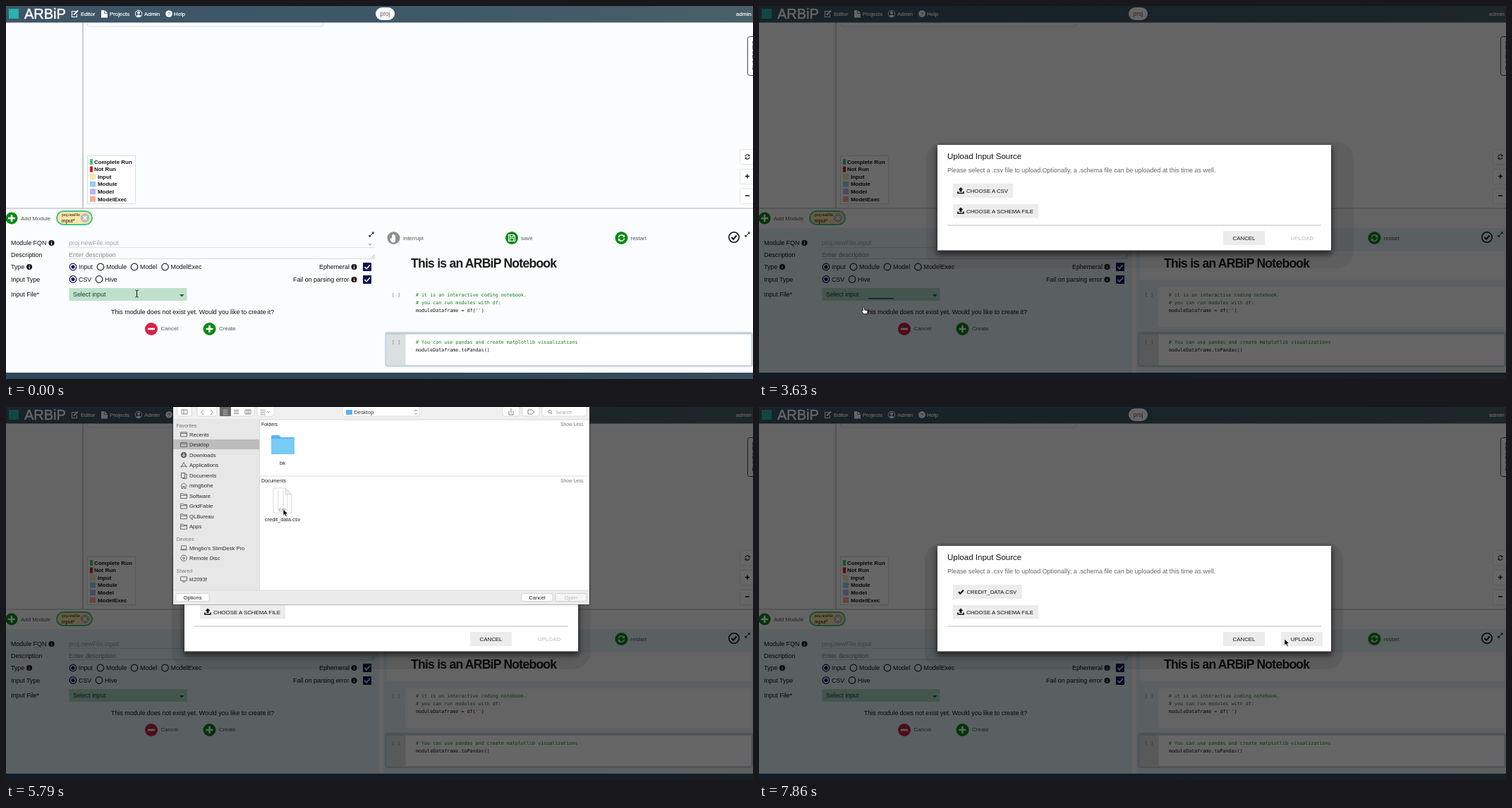
Recreate the animation shown at these times as an HTML page. Size 1059 px wide and 529 px high, loop 8 s.

```html
<!DOCTYPE html>
<html lang="en">
<head>
<meta charset="utf-8">
<title>Notebook upload</title>
<style>
html, body { margin: 0; width: 100%; height: 100%; overflow: hidden; background: #fafcfd; }
svg { display: block; width: 100%; height: 100%; }
text { font-family: "Liberation Sans", Arial, sans-serif; white-space: pre; }
.mono { font-family: "DejaVu Sans Mono", monospace; }
</style>
</head>
<body>
<svg id="stage" viewBox="0 0 1059 529" preserveAspectRatio="none"></svg>
<script>
const GREEN = '#078a14', NAVY = '#0c0f52', GREY = '#555';

const text = (x, y, s, size = 8.9, fill = '#111', extra = '') =>
  `<text x="${x}" y="${y}" font-size="${size}" fill="${fill}" ${extra}>${s}</text>`;
const mid = (x, y, s, size, fill) => text(x, y, s, size, fill, 'text-anchor="middle"');
const bold = (x, y, s, size, fill) => text(x, y, s, size, fill, 'font-weight="bold"');
const code = (x, y, s, fill = '#111') => text(x, y, s, 6.69, fill, 'class="mono"');
const rect = (x, y, w, h, fill, extra = '') =>
  `<rect x="${x}" y="${y}" width="${w}" height="${h}" fill="${fill}" ${extra}/>`;
const circle = (x, y, r, fill, extra = '') =>
  `<circle cx="${x}" cy="${y}" r="${r}" fill="${fill}" ${extra}/>`;
const line = (d, stroke, w = 1, extra = '') =>
  `<path d="${d}" fill="none" stroke="${stroke}" stroke-width="${w}" ${extra}/>`;
const shape = (d, fill, extra = '') => `<path d="${d}" fill="${fill}" ${extra}/>`;
const at = (x, y, s) => `<g transform="translate(${x} ${y})">${s}</g>`;
const group = (id, s, extra = '') => `<g id="${id}" ${extra}>${s}</g>`;

const refresh = (x, y, c, k = 1) => at(x, y, `<g transform="scale(${k})">` +
  line('M-3.6-.6A3.7 3.7 0 0 1 2.8-2.5M3.6.6A3.7 3.7 0 0 1-2.8 2.5', c, 1.3) +
  shape('M4-4V-.8H.8ZM-4 4V.8H-.8Z', c) + '</g>');
const info = (x, y) => circle(x, y, 4, '#111') +
  line(`M${x} ${y - .6}v3M${x} ${y - 2.6}v1.2`, '#fff', 1.3);
const radio = (x, y, label, on) =>
  circle(x, y, 4.8, '#fff', `stroke="${on ? NAVY : '#222'}" stroke-width="1.2"`) +
  (on ? circle(x, y, 2.6, NAVY) : '') + text(x + 8, y + 3, label);
const checkbox = y => rect(506, y, 12, 12, NAVY, 'rx="1"') +
  line(`M508.5 ${y + 6}l2.5 2.8 5-5.5`, '#fff', 1.5);
const round = (x, y, fill, mark, r = 9) => circle(x, y, r, fill) +
  line(`M${x - 5} ${y}h10` + (mark === '+' ? `M${x} ${y - 5}v10` : ''), '#fff', 2.6);
const expand = (x, y) => line(`M${x - 2.5} ${y + 2.5}l5-5`, '#111') +
  shape(`M${x + .3} ${y - 3.5}h3.2v3.2zM${x - .3} ${y + 3.5}h-3.2v-3.2z`, '#111');

function header() {
  const item = (x, s) => text(x, 14, s, 7.8, '#fff', 'stroke="#fff" stroke-width=".2"');
  return rect(0, 0, 1059, 23.5, 'url(#bar)') + rect(4, 4, 14, 14, '#27b3ae') +
    text(26, 18, 'ARBiP', 20, '#fff', 'stroke="#fff" stroke-width=".5"') +
    item(106, 'Editor') + item(147, 'Projects') + item(196, 'Admin') + item(238, 'Help') +
    line('M99.5 7.5h-6v8h7v-4', '#fff', 1.1) + line('M96 12.5l6-6', '#fff', 2) +
    shape('M135 6h5l4 4v6.5h-9z', '#fff') + line('M139.5 6v4.5h4.5', '#50697a', .8) +
    circle(188, 11, 4.8, 'none', 'stroke="#fff"') + circle(188, 9.5, 2, '#fff') +
    shape('M184.5 14.3q3.5-4 7 0q-3.5 3-7 0', '#fff') +
    circle(231, 11, 4.8, '#fff') + mid(231, 14, '?', 8, '#3e5668') +
    rect(524, 2, 27, 18, '#fff', 'rx="9"') + mid(537.5, 14, 'proj', 8.3, GREY) +
    text(1035, 14, 'admin', 8, '#fff', 'stroke="#fff" stroke-width=".15"');
}

function canvasArea() {
  const legend = [['Complete Run', '#3cc47c'], ['Not Run', '#e0141c'], ['Input', '#fbe5a6'],
    ['Module', '#94cdf3'], ['Model', '#b7b1f8'], ['ModelExec', '#fba99c']];
  return line('M109 23V287', '#c9cbcc', 2) +
    line('M115.5 23v3q0 3 3 3h328q3 0 3-3v-3', '#dcdfe0') +
    rect(1051.5, 43.5, 20, 55, '#fff', 'rx="3" stroke="#333" stroke-width=".9"') +
    text(0, 0, 'RUNTIMES', 8, '#222', 'transform="translate(1062.5 91) rotate(-90)"') +
    [203, 231, 259].map(y => rect(1040.5, y + .5, 24, 21, '#fff', 'rx="2" stroke="#e1e4e6"')).join('') +
    refresh(1051, 214, '#111', .85) +
    line('M1048 241.5h6M1051 238.5v6M1048 269h6', '#111', 1.4) +
    rect(115.5, 212.5, 68, 68, '#fff', 'stroke="#dadddf"') +
    legend.map(([s, c], i) => {
      const y = 221 + i * 10.55;
      return rect(119, y - 4, i < 2 ? 4 : 8, 8, c) + bold(i < 2 ? 125 : 130, y + 2.8, s, 7.95);
    }).join('') + line('M0 287H1059', '#c9cccd', 1.6);
}

function form() {
  return round(8, 301, GREEN, '+', 8.5) + text(21, 303.5, 'Add Module', 7.9, GREY) +
    rect(72, 291, 50, 19, '#fae6a8', 'rx="9.5" stroke="#45c48a" stroke-width="2"') +
    text(79, 298, 'proj.newFile', 4.8) + text(79, 306.5, 'input*', 7.3) +
    circle(112, 300.5, 6.3, '#b9bdbd') + line('M109.5 298l5 5m0-5l-5 5', '#fff', 1.5) +
    expand(518, 324) + text(7, 339, 'Module FQN') + info(64.5, 336) +
    text(89, 339, 'proj.newFile.input', 9, '#a2a6a9') + line('M89 342.5H523', '#dfe3e5') +
    shape('M513 337h6l-3 3z', '#bbb') + text(7, 356, 'Description') +
    text(89, 356, 'Enter description', 8.9, '#858a8d') + line('M89 358.5H523', '#d5d9db') +
    line('M518 357.5l5-5M521 357.5l2-2', '#999', .8) +
    text(7, 373, 'Type') + info(33, 370) + radio(95, 370, 'Input', 1) + radio(134, 370, 'Module') +
    radio(182, 370, 'Model') + radio(225.5, 370, 'ModelExec') +
    text(444, 373, 'Ephemeral') + info(493.5, 370) + checkbox(364) +
    text(7, 391, 'Input Type') + radio(95, 387.5, 'CSV', 1) + radio(132, 387.5, 'Hive') +
    text(407, 391, 'Fail on parsing error') + info(493.5, 388) + checkbox(382) +
    text(7, 412, 'Input File*') + rect(89.5, 400, 167, 18, '#bfe1cb') +
    text(95, 412, 'Select input', 8.9, '#233f30') + shape('M246 409h6.5l-3.25 3.5z', '#275a36') +
    text(149, 437, 'This module does not exist yet. Would you like to create it?') +
    round(206, 458, '#d92046', '-') + text(219.5, 460, 'Cancel', 7.9, GREY) +
    round(288.5, 458, GREEN, '+') + text(302, 460, 'Create', 7.9, GREY);
}

function notebook() {
  const label = (x, s) => text(x, 331.5, s, 7.9, GREY);
  return circle(549.5, 329, 9, '#8f9191') +
    shape('M545 329l2 1v-5h1.2v-1.5h1.3v1h1.3v1h1.3v8q-1 2-3.5 2q-2 0-4-4z', '#fff') +
    label(563, 'interrupt') + circle(717, 329, 9, GREEN) +
    line('M712.5 324.5h7l2 2v7h-9zM714.5 324.5v3h4.5v-3M714.5 333v-3.5h5v3.5', '#fff', 1.1) +
    label(730, 'save') + circle(872.5, 329, 9, GREEN) + refresh(872.5, 329, '#fff', 1.15) +
    label(885.5, 'restart') + circle(1032, 328, 7.2, '#fff', 'stroke="#111" stroke-width="1.6"') +
    line('M1028.5 328l2.6 2.8 4.6-5.3', '#111', 2) + expand(1051, 324) +
    text(574, 371, 'This is an ARBiP Notebook', 17.6, '#1c1c1c', 'font-weight="bold" letter-spacing="-.78"') +
    code(547, 411.5, '[ ]', '#777') + code(581, 411.5, '# it is an interactive coding notebook.', '#157a15') +
    code(581, 423, '# you can run modules with df:', '#157a15') +
    code(581, 434, 'moduleDataframe = df(<tspan fill="#b22">\'\'</tspan>)') +
    rect(538.5, 463.5, 519, 47, '#fff', 'rx="2" stroke="#c4d3da" stroke-width="2.5"') +
    rect(540, 465, 26.5, 44, '#dcdfe0') + line('M540 465H1056', '#aebbc1', 1) +
    code(547, 479, '[ ]', '#777') +
    code(581, 479, '# You can use pandas and create matplotlib visualizations', '#157a15') +
    code(581, 490, 'moduleDataframe.toPandas()') +
    rect(0, 520, 1059, 9, 'url(#bar)') + rect(0, 520, 1059, 9, '#152a44', 'opacity=".35"');
}

function dim() {
  const panels = 'M0 315H529V520H0ZM535 315H1059V520H535Z';
  const cells = 'M540 348H1057V388H540ZM566 399H1057V455H566ZM538 463H1058V511H538Z';
  return rect(0, 0, 1059, 529, '#000', 'opacity=".6"') +
    shape(panels + cells, '#e4f1f6', 'fill-rule="evenodd" style="mix-blend-mode:multiply"') +
    group('wideShade', rect(237, 193, 606, 179, '#000', 'rx="24" opacity=".06"')) +
    group('sheetShade', rect(235, 193, 593, 179, '#000', 'rx="24" opacity=".08"')) +
    rect(251, 199, 562, 154, '#000', 'rx="6" opacity=".5" filter="url(#blur)"');
}

const upIcon = (x, y) => shape(`M${x} ${y - 5}l3.5 3.5h-2v3h-3v-3h-2z`, '#111') +
  line(`M${x - 4} ${y + 1}v2.5h8v-2.5`, '#111', 1.7);

function modal() {
  return rect(253, 197, 558, 149.5, '#fff') + text(267, 217, 'Upload Input Source', 11.55) +
    text(267, 236, 'Please select a .csv file to upload.Optionally, a .schema file can be uploaded at this time as well.', 8.95, '#666') +
    group('pick', rect(275, 252, 85, 20, '#ececec', 'id="pickBg"') + upIcon(286, 262) +
      text(294, 265, 'CHOOSE A CSV', 7.88)) +
    group('picked', rect(275, 252, 98, 20, '#ececec') + line('M283 262.3l2.3 2.4 4.5-5', '#111', 2.2) +
      text(294.5, 265, 'CREDIT_DATA.CSV', 7.75)) +
    rect(275, 281, 121, 19.5, '#ececec', 'id="schemaBg"') + upIcon(286, 290.5) +
    text(294, 293.5, 'CHOOSE A SCHEMA FILE', 7.88) + line('M267 311H797', '#dedede', 2) +
    rect(658, 319, 59, 20, '#ececec') + mid(687.5, 332, 'CANCEL', 7.9, '#111') +
    group('upOff', mid(770, 332, 'UPLOAD', 7.9, '#bdbdbd')) +
    group('upOn', rect(740, 319, 59, 20, '#ececec') + mid(770, 332, 'UPLOAD', 7.9, '#111'));
}

function sideIcon(kind, x, y) {
  const g = '#666';
  const d = {
    box: 'M-4.5-3h9v6h-9zM-4.5-1.3h9',
    folder: 'M-4.5 3.5v-7h3.5l1 1.3h4.5v5.7zM-4.5-.8h9',
    page: 'M-3.5-3.5h5v7h-5zM1.5-2h2.5v6.5h-5v-1',
    home: 'M-4.5 0l4.5-4 4.5 4M-3 0v4h2v-3h2v3h2v-4',
    app: 'M-4 3.5l4-7.5 4 7.5M-4.5 1.5h9',
    laptop: 'M-3.5-3h7v5h-7zM-5 3h10',
    screen: 'M-4.5-3.5h9v5.5h-9zM-2 3.7h4'
  }[kind];
  return at(x, y, kind === 'down' ? circle(0, 0, 4.3, g) + line('M0-2.5v4.5M-2 .3l2 2 2-2', '#eee')
    : kind === 'disc' ? circle(0, 0, 4.2, 'none', `stroke="${g}"`) + circle(0, 0, 1.4, 'none', `stroke="${g}"`)
    : line(d, g, .95));
}

function sheet() {
  const push = (x, w, s, id, fill = '#fff', ink = '#222') =>
    group(id, rect(x, 264.5, w, 11, fill, 'rx="2.5" stroke="#c6c6c6" stroke-width=".7"') +
      mid(x + w / 2, 272.7, s, 7.5, ink));
  const tool = (x, w) => rect(x, -4, w, 17, '#fff', 'rx="2.5" stroke="#d0d0d0" stroke-width=".7"');
  const item = ([icon, s], y) => sideIcon(icon, 252, y - 2.7) + text(260, y, s, 7.6, '#2b2b2b');
  const fav = [['box', 'Recents'], ['box', 'Desktop'], ['down', 'Downloads'], ['app', 'Applications'],
    ['page', 'Documents'], ['home', 'mingbohe'], ['folder', 'Software'], ['folder', 'GridFable'],
    ['folder', 'QLBureau'], ['folder', 'Apps']];
  const head = (y, s) => text(241.5, y, s, 7, '#777');
  const paper = shape('M379 115h17l9 9v26h-26z', '#fff', 'stroke="#cfcfcf" stroke-width=".8"') +
    shape('M396 115v9h9z', '#eee', 'stroke="#cfcfcf" stroke-width=".8"');
  return rect(237, 0, 590, 280, '#fff') + rect(237, 0, 590, 18, '#f0f0f0') + line('M237 18H827', '#d5d5d5') +
    tool(243, 20) + tool(271, 27) + tool(303, 49) + tool(356, 24) + tool(477, 109) + tool(704, 24) +
    tool(732, 24) + tool(760, 63) + rect(303, -4, 16, 17, '#6a6a6a') +
    line('M249 4h8v6h-8zM252 4v6M280 4l-3 3.5 3 3.5M290 4l3 3.5-3 3.5M323 4.5h7M323 7h7M323 9.5h7M339 4h8v6h-8zM341.7 4v6M344.3 4v6M370 6l2 2 2-2M579 6l2-2 2 2M579 8.5l2 2 2-2M713 6v5h6v-5M716 9v-7M740 4h6l3 3-3 3h-6zM774 10l-2-2', '#777', .9) +
    line('M308 4.5h6M308 7.5h6M308 10.5h6M361 4.5h7M361 7.5h7M361 10.5h7', '#aaa', 2, 'stroke-dasharray="1.6 .8"') +
    circle(771, 6.5, 2.2, 'none', 'stroke="#888" stroke-width=".9"') + text(779, 10, 'Search', 7.5, '#aaa') +
    rect(482, 4, 9, 7, '#58b4ea', 'rx="1"') + text(493.5, 10, 'Desktop', 7.6, '#333') +
    rect(237, 18.5, 122.5, 241.5, '#e7e7e7') + rect(237, 46, 122.5, 14, '#bcbcbc') +
    line('M359.5 18V260', '#d2d2d2', .8) + head(29, 'Favorites') +
    fav.map((f, i) => item(f, 41.6 + i * 14.53)).join('') +
    head(190, 'Devices') + item(['laptop', 'Mingbo\'s SlimDesk Pro'], 202.5) + item(['disc', 'Remote Disc'], 217) +
    head(234.5, 'Shared') + item(['screen', 'kt2093f'], 247) +
    text(362, 26.5, 'Folders', 6.9, '#222') + text(786, 26.5, 'Show Less', 6.7, '#777') +
    shape('M376 42q0-2 2-2h9l3 3h17q2 0 2 2v20q0 2-2 2h-29q-2 0-2-2z', '#54b9ec') +
    rect(376, 45, 33, 22, '#78ccf5', 'rx="1.5"') + mid(392, 81.5, 'bk', 7.5, '#222') +
    line('M360 98H827', '#dcdcdc') + text(362, 106.5, 'Documents', 6.9, '#222') +
    text(786, 106.5, 'Show Less', 6.7, '#777') +
    group('fileOff', paper + line('M386 118v30M393 118v30M399 124v24', '#e2e2e2', 1.2) +
      mid(392, 148, 'CSV', 5, '#555') + mid(392, 161.5, 'credit_data.csv', 7.5, '#222')) +
    group('fileOn', rect(372, 113, 40, 39, '#e3e3e3', 'rx="2"') + paper + mid(392, 148, 'CSV', 5, '#444') +
      rect(366, 154, 52, 10, '#fdc708', 'rx="1.5"') + mid(392, 161.5, 'credit_data.csv', 7.5, '#fff')) +
    rect(237, 260, 590, 20, '#ececec') + line('M237 260H827', '#d6d6d6', .8) +
    push(241, 47, 'Options', 'options') + push(731, 44, 'Cancel', 'cancel') +
    push(779, 44, 'Open', 'openOff', '#f6f6f6', '#b5b5b5') + push(779, 44, 'Open', 'openOn', '#1a7cf8', '#fff');
}

const cursors = {
  beam: line('M-2.2-5q2.2 0 2.2 1.2v7.6q0 1.2-2.2 1.2M2.2-5q-2.2 0-2.2 1.2v7.6q0 1.2 2.2 1.2', '#111', .9),
  hand: shape('M-.9.8q0-1.2 1-1.2t1 1.2v3l3.8 1q1.2.5.9 1.8l-.9 3.2h-4.5l-2.7-3.5q-.6-1.4.6-1.3l.8.7z',
    '#fff', 'stroke="#111" stroke-width=".9"'),
  arrow: shape('M0 0v9.2l2.2-2 1.5 3.4 1.6-.7-1.5-3.3h3z', '#000', 'stroke="#fff" stroke-width=".7"')
};

const stage = document.getElementById('stage');
stage.innerHTML = `<defs>
  <linearGradient id="bar"><stop stop-color="#3e5567"/><stop offset=".5" stop-color="#3d5767"/><stop offset="1" stop-color="#4a6068"/></linearGradient>
  <filter id="blur" x="-10%" y="-20%" width="120%" height="140%"><feGaussianBlur stdDeviation="3.5"/></filter>
  <clipPath id="leaving"><path d="M360 31H827V260H360ZM237 46H359.5V60H237ZM237 260H827V280H237Z"/></clipPath></defs>` +
  rect(0, 0, 1059, 529, '#fafcfd') + canvasArea() + form() + notebook() + header() +
  rect(0, 414, 0, 1.6, '#16752c', 'id="underline"') +
  group('menu', rect(90, 419, 168, 23, '#000', 'opacity=".25" filter="url(#blur)"') +
    rect(89, 418, 168, 22, '#eee') + text(95, 432, 'Upload a csv')) +
  group('dim', dim()) + group('ghost', rect(237, -9, 590, 252, '#000', 'id="ghostBg" opacity=".05"')) +
  group('modal', modal()) +
  group('rim', line('', '#000', 1.6, 'id="rimLine" opacity=".4"')) +
  group('sheet', sheet()) +
  Object.keys(cursors).map(k => group(k, cursors[k])).join('');

const el = {};
stage.querySelectorAll('[id]').forEach(e => el[e.id] = e);

// Each step overrides part of the state before it.
const steps = [
  [0, { cur: ['beam', 185.5, 408] }],
  [140, { cur: ['beam', 212, 409.5] }],
  [380, { cur: ['beam', 229, 410.5] }],
  [980, { cur: ['beam', 235, 410.5] }],
  [1120, { cur: ['beam', 238.7, 410.5] }],
  [2890, { bar: [150, 50] }],
  [3040, { bar: [89.5, 167], menu: .5 }],
  [3190, { menu: 1, cur: ['hand', 215, 421] }],
  [3340, { cur: ['hand', 166, 427] }],
  [3480, { cur: ['hand', 148, 427] }],
  [3630, { menu: 0, modal: 1, wide: 1, bar: [155, 36] }],
  [3780, { bar: 0 }],
  [4010, { cur: ['hand', 158, 420] }],
  [4160, { cur: ['arrow', 205, 372] }],
  [4310, { cur: ['arrow', 258, 322] }],
  [4450, { cur: ['hand', 302, 287], hover: 'schema' }],
  [4600, { cur: ['hand', 319, 267], hover: 'pick' }],
  [4750, { cur: ['hand', 324, 260] }],
  [5050, { ghost: 60, wide: 0, shade: 1 }],
  [5200, { ghost: 243 }],
  [5350, { ghost: 280, sheet: 1, hover: '' }],
  [5490, { cur: ['arrow', 343, 225] }],
  [5640, { cur: ['arrow', 381, 166] }],
  [5790, { cur: ['arrow', 393, 145] }],
  [5940, { file: 1, open: 1 }],
  [6090, { cur: ['arrow', 421, 154] }],
  [6230, { cur: ['arrow', 763, 267] }],
  [6530, { cur: ['arrow', 799, 267] }],
  [6830, { sheet: 2, ghost: 279 }],
  [6970, { sheet: 0, ghost: 150 }],
  [7120, { ghost: 0 }],
  [7420, { picked: 1, cur: ['arrow', 796, 275] }],
  [7570, { cur: ['arrow', 779, 306] }],
  [7710, { cur: ['arrow', 757, 324] }],
  [7860, { cur: ['arrow', 745, 329] }]
];

const show = (id, on) => { el[id].style.display = on ? '' : 'none'; };

function draw(s) {
  for (const k in cursors) show(k, k === s.cur[0]);
  el[s.cur[0]].setAttribute('transform', `translate(${s.cur[1]} ${s.cur[2]})`);
  show('underline', s.bar);
  if (s.bar) {
    el.underline.setAttribute('x', s.bar[0]);
    el.underline.setAttribute('width', s.bar[1]);
  }
  show('menu', s.menu);
  el.menu.setAttribute('transform', `translate(0 ${418 * (1 - (s.menu || 1))}) scale(1 ${s.menu || 1})`);
  show('dim', s.modal);
  show('modal', s.modal);
  show('wideShade', s.wide);
  show('sheetShade', s.shade);
  show('ghost', s.ghost);
  show('rim', s.ghost);
  if (s.ghost) {
    el.ghostBg.setAttribute('height', s.ghost + 9);
    el.rimLine.setAttribute('d', `M236.5 23V${s.ghost}H827.5V23`);
  }
  show('sheet', s.sheet);
  el.sheet.setAttribute('clip-path', s.sheet === 2 ? 'url(#leaving)' : 'none');
  el.sheet.setAttribute('transform', `translate(0 ${s.sheet === 2 ? -1 : 0})`);
  show('fileOff', !s.file);
  show('fileOn', s.file);
  show('openOff', !s.open);
  show('openOn', s.open);
  show('pick', !s.picked);
  show('picked', s.picked);
  show('upOff', !s.picked);
  show('upOn', s.picked);
  el.pickBg.setAttribute('fill', s.hover === 'pick' ? '#d0d0d0' : '#ececec');
  el.schemaBg.setAttribute('fill', s.hover === 'schema' ? '#d0d0d0' : '#ececec');
}

let state = {};
const states = steps.map(([t, change]) => [t, state = { ...state, ...change }]);
const start = performance.now();
let last;

function tick() {
  const t = (performance.now() - start) % 8000;
  const now = states.findLast(([from]) => from <= t)[1];
  if (now !== last) draw(last = now);
  requestAnimationFrame(tick);
}
tick();
</script>
</body>
</html>
```
